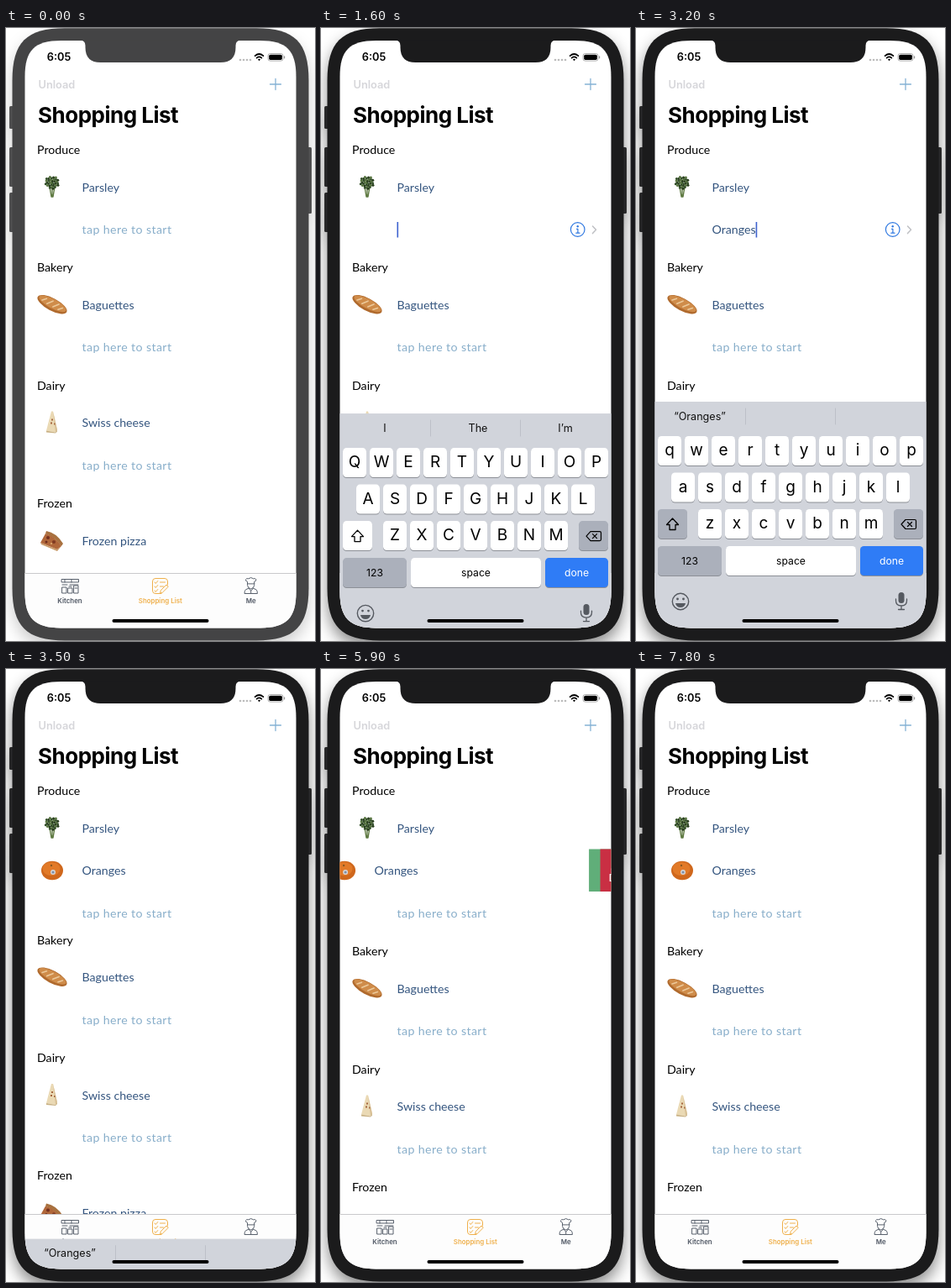
Recreate the animation shown at these times as an HTML page. Size 368 by 730 pixels, loop 8 s.

```html
<!DOCTYPE html>
<html lang="en">
<head>
<meta charset="utf-8">
<title>Shopping list</title>
<style>
html, body { margin: 0; width: 100%; height: 100%; overflow: hidden; background: #fff }
svg { display: block; width: 368px; height: 730px }
text { font-family: Inter, sans-serif }
.list { font: 14.2px Lato, sans-serif }
.item { fill: #34557f }
.hint { fill: #88aeca; letter-spacing: .38px }
.mid { text-anchor: middle }
.key { font-size: 19px }
.small { font-size: 12.2px }
.word { font-size: 12.6px }
.tab { font-size: 7.9px; font-weight: 600; fill: #4c5461 }
.line { fill: none; stroke-linecap: round; stroke-linejoin: round }
.action { font-size: 12px; font-weight: 500; fill: #fff }
</style>
</head>
<body>
<svg id="stage" viewBox="0 0 368 730"></svg>
<script>
const LOOP = 8000, STEP = 100;
const stage = document.getElementById('stage');

const text = (x, y, cls, label, more = '') =>
  `<text x="${x}" y="${y}" class="${cls}" ${more}>${label}</text>`;
const box = (x, y, w, h, r, fill, more = '') =>
  `<rect x="${x}" y="${y}" width="${w}" height="${h}" rx="${r}" fill="${fill}" ${more}/>`;
const line = (d, color, width = 1) =>
  `<path class="line" d="${d}" stroke="${color}" stroke-width="${width}"/>`;
const at = (x, y, inner, id = '') => `<g id="${id}" transform="translate(${x} ${y})">${inner}</g>`;

// Rectangle whose corners blend smoothly into the sides
function softBox(x, y, w, h, r) {
  const s = 1.3 * r, c = .35 * r, X = x + w, Y = y + h;
  return `<path d="M${x} ${y + s}C${x} ${y + c} ${x + c} ${y} ${x + s} ${y}H${X - s}
    C${X - c} ${y} ${X} ${y + c} ${X} ${y + s}V${Y - s}C${X} ${Y - c} ${X - c} ${Y} ${X - s} ${Y}
    H${x + s}C${x + c} ${Y} ${x} ${Y - c} ${x} ${Y - s}Z"/>`;
}

// Food pictures, each centred on its own origin
function parsley() {
  let leaves = '';
  for (let i = 0; i < 34; i++) {
    const a = i * 2.4, r = Math.sqrt(i / 34);
    const x = Math.cos(a) * r * 8.5, y = -5 + Math.sin(a) * r * 7.5;
    leaves += `<circle cx="${x * (1 - Math.max(0, y) / 8)}" cy="${y}" r="1.5" fill="${['#34502a', '#587540', '#273d1d'][i % 3]}"/>`;
  }
  return line('M-1 12L-3 0M0 12V0M1 12L3 0', '#5f7a42', 1.4) + leaves;
}
const baguette = () => `<g transform="rotate(28)">
  <ellipse rx="19.5" ry="7.4" fill="#b06a2d"/><ellipse cy="-1" rx="18" ry="5.6" fill="#cf8c4a"/>
  ${line('M-13 1l4-4M-6 2l5-6M2 2l5-6M9 2l4-4', '#ecc99a', 1.6)}</g>`;
const cheese = () => `<path d="M-1-13L1-13 6 9 4 12-7 10Z" fill="#ead9b4"/>
  <path d="M1-13L6 9 4 12Z" fill="#d8c096"/><path d="M-7 10L4 12 6 9 6 11 4 13-7 12Z" fill="#c9b183"/>
  <path d="M-1-4h2v2h-2zM-2 0h2v2h-2zM2 1h1.500v2h-1.500z" fill="#a5673f"/>`;
const pizza = () => `<path d="M-7-11Q5-9 13 4L11 7Q3-4-8-8Z" fill="#a8713f"/>
  <path d="M-8-8Q3-5 11 7L6 11-14 3Z" fill="#b0673a"/><path d="M-14 3L6 11 11 7 6 13-13 5Z" fill="#c79a68"/>
  <circle cx="-5" cy="-3" r="2" fill="#74301f"/><circle cx="2" cy="2" r="2.100" fill="#7f3a22"/>
  <circle cx="-7" cy="2" r="1.500" fill="#6d2c1d"/><circle cx="-1" cy="4" r="1" fill="#e2b274"/>`;
const orange = () => `<ellipse rx="13" ry="11.2" fill="#cf671c"/>
  <ellipse cx="-1" cy="-2" rx="10.5" ry="8" fill="#e27a28"/><circle cx="-1" cy="-6" r="1.2" fill="#8b5a22"/>
  <circle cx="1" cy="2" r="3" fill="#d8d6d8"/><circle cx="1" cy="2" r="1.6" fill="#7d8fa8"/>`;

const hint = y => text(90.5, y, 'list hint', 'tap here to start');
const section = (y, title, name, picture) =>
  text(37, y, 'list', title) + text(90.5, y + 44.6, 'list item', name) + at(55, y + 39, picture());

const header = () =>
  text(38.5, 71.8, '', 'Unload', 'font-size="12.8" font-weight="600" fill="#d6d6da"') +
  line('M314.5 67h13M321 60.5v13', '#85b2d5', 1.3) +
  text(38, 112.5, '', 'Shopping List', 'font-size="26" font-weight="700" letter-spacing="-.5"');

const status = () =>
  text(48.8, 39.3, '', '6:05', 'font-size="12.8" font-weight="600"') +
  [279, 283, 287, 291].map(x => `<circle cx="${x}" cy="38" r="1.3" fill="#bbb"/>`).join('') +
  line('M296.6 33.2q4.9-4.4 9.8 0M298.6 35.6q2.9-2.5 5.8 0', '#000', 1.7) +
  '<path d="M299.9 37.3q1.6-1.3 3.2 0l-1.6 1.9z"/>' +
  box(312, 30.5, 18, 8.6, 2.6, 'none', 'stroke="#999" stroke-width=".8"') +
  box(313.2, 31.7, 15.6, 6.2, 1.6, '#000') + box(331, 33.2, 1.2, 3.2, .6, '#999');

function tabBar() {
  const ink = '#59616d', gold = '#efb04c';
  return box(22, 649, 324, 66, 0, '#fdfdfd') + line('M22 649.5h324', '#c9c9cb') +
    line('M66.5 656.5h20v3.5h-20zM70 656.5v3.5M78 656.5v3.5M67 663h6M76 663h10M67 666h5v7h-5zM74 667h5v6h-5zM75 665h3M81 664h5v9h-5zM82 667h3', ink) +
    text(76, 685, 'tab mid', 'Kitchen') +
    line('M192.5 663v-4q0-3.5-3.5-3.5h-11q-3.5 0-3.5 3.5v11q0 3.5 3.5 3.5h7M177 660l1.3 1.5 2.5-3M177 665l1.3 1.5 2.5-3M177 670l1.3 1.5 2.5-3M183.5 660h6M183.5 665h4M183.5 673l1-3.5 6.5-6.5 2.3 2.3-6.5 6.5z', gold) +
    text(183.8, 685, 'tab mid', 'Shopping List', `style="fill:${gold}"`) +
    line('M287.5 661.5v-2.2q-2.5-.6-2-2.5 1-2 3.2-1 3-2.5 6 0 2.5-.8 3.2 1 .2 2-2.2 2.5v2.2zM287.5 661.5v2q.5 4 4.2 4.5 3.5-.5 4-4.5v-2M289.5 667l-4 1.8q-1.5 1-1.5 4.7h15.4q0-3.7-1.5-4.7l-4-1.8M289.5 668l2.2 2 2.2-2M291.7 670v3', ink) +
    text(291.7, 685, 'tab mid', 'Me');
}

function keyboard() {
  const cap = (x, y, w, fill = '#fff', id = '') =>
    box(x, y + 1, w, 35, 4.5, '#8c8f96') + box(x, y, w, 35, 4.5, fill, `id="${id}"`);
  const rows = ['qwertyuiop', 'asdfghjkl', 'zxcvbnm'];
  let out = box(22, 445, 324, 285, 0, '#d1d4db') + line('M130.5 453v19M237.5 453v19', '#bcc0c8') +
    [76, 187, 291].map(x => text(x, 466.8, 'mid word', '')).join('');
  rows.forEach((row, r) => [...row].forEach((c, i) => {
    const x = [40, 56, 88][r] + i * 32, y = 486 + r * 43.5;
    out += cap(x - 14, y, 28) + text(x, y + 23, 'key mid letter', c);
  }));
  const grey = '#abb0bb', dark = '#555960';
  return out +
    cap(26, 573, 35, grey, 'shift') + line('M43.5 584l7 7.5h-3.5v6h-7v-6h-3.5z', '#000', 1.3) +
    cap(307, 573, 35, grey) + line('M316 591l5-5.5h11q1.5 0 1.5 1.5v8q0 1.5-1.5 1.5h-11zM323.5 588.5l5 5M328.5 588.5l-5 5', '#000', 1.2) +
    cap(26, 617, 76, grey) + text(64, 639, 'small mid', '123') +
    cap(107, 617, 155) + text(184.5, 638.5, 'small mid', 'space') +
    cap(267, 617, 75, '#2f7cf6') + text(304.5, 638.5, 'small mid', 'done', 'fill="#fff"') +
    `<circle cx="53" cy="683" r="9.7" fill="none" stroke="${dark}" stroke-width="1.4"/>
    <circle cx="49.5" cy="680" r="1.4" fill="${dark}"/><circle cx="56.5" cy="680" r="1.4" fill="${dark}"/>
    <path d="M47 685h12q-1 5-6 5t-6-5z" fill="${dark}"/>` +
    box(312.5, 672, 7, 13, 3.5, dark) + line('M309.5 680v2q0 6 6.5 6t6.5-6v-2M316 688v4.5M312.5 692.5h7', dark, 1.3);
}

const field = () => text(90.5, 244.8, 'list item', '', 'id="typed"') +
  box(0, 231, 1.6, 18.5, 0, '#3d62cf', 'id="caret"') +
  '<circle cx="305.7" cy="240" r="8.3" fill="none" stroke="#2f78e0" stroke-width="1.2"/>' +
  '<circle cx="305.7" cy="236.3" r="1.2" fill="#2f78e0"/>' +
  line('M304.5 239.3h1.4v4.7M303.8 244.2h4.2', '#2f78e0', 1.2) +
  line('M323.5 236l4 4.3-4 4.3', '#bfc0c4', 1.5);

const loadButton = () => box(0, 214.5, 58, 50.5, 0, '#60ae79') + text(28.5, 244.3, 'action mid', 'Load');
const deleteButton = () => box(0, 214.5, 58, 50.5, 0, '#c92f43') +
  line('M23.5 225.5h10M27 225v-1.5h3v1.5', '#fff', 1.2) +
  '<path d="M24 227h9l-.8 9.5h-7.4z" fill="#fff"/>' + line('M27 229v5.5M30 229v5.5', '#c92f43', .8) +
  text(28.5, 253.3, 'action mid', 'Delete');

const fade = (id, from, to) => `<linearGradient id="${id}"><stop offset="${from}" stop-color="#111"/>
  <stop offset="${to}" stop-color="#d1d4db"/></linearGradient>`;

stage.innerHTML = `<defs>
  <clipPath id="screen">${softBox(22.5, 15, 323, 699.5, 33)}</clipPath>
  ${fade('late', .65, 1.12)}${fade('later', -.5, .6)}</defs>
  <g id="body">
    <g opacity=".93">${box(4, 93, 8, 27, 1.5, 'inherit')}${box(4, 142, 8, 47, 1.5, 'inherit')}
    ${box(4, 196, 8, 47, 1.5, 'inherit')}${box(356, 142, 8, 79, 1.5, 'inherit')}</g>
    ${softBox(7.5, .3, 353, 729.2, 48)}
  </g>
  <g clip-path="url(#screen)">
    ${box(22, 15, 324, 700, 0, '#fff')}${header()}
    ${section(150, 'Produce', 'Parsley', parsley)}
    <g id="empty">${hint(244.8)}</g>
    <g id="field">${field()}</g>
    <g id="added">${at(0, 0, text(90.5, 244.8, 'list item', 'Oranges') + at(55, 240, orange()), 'row')}
      ${at(346, 0, loadButton(), 'load')}${at(346, 0, deleteButton(), 'remove')}</g>
    <g id="fresh">${hint(295.8)}</g>
    <g id="rest">
      ${section(290.2, 'Bakery', 'Baguettes', baguette)}${hint(385.2)}
      ${section(430.6, 'Dairy', 'Swiss cheese', cheese)}${hint(525.6)}
      ${section(571, 'Frozen', 'Frozen pizza', pizza)}
    </g>
    ${tabBar()}<g id="keyboard">${keyboard()}</g>
    ${status()}${box(126.5, 704, 115, 4, 2, '#000')}
  </g>
  <path id="notch" d="M88 14.5q6.5 0 6.5 6.5v2q0 18 18 18h143q18 0 18-18v-2q0-6.5 6.5-6.5z"/>`;

const $ = id => document.getElementById(id);
const words = [...stage.querySelectorAll('.word')];
const letters = [...stage.querySelectorAll('.letter')];
const lower = letters.map(k => k.textContent);

const typing = [[1400, ''], [2000, 'O'], [2300, 'Or'], [2500, 'Ora'], [2600, 'Oran'],
  [2800, 'Orang'], [2900, 'Orange'], [3000, 'Oranges']];
const guesses = [[1400, 'I', 'The', 'I’m'], [2100, '“O”', 'Of', 'On'], [2500, '“Or”', 'Ordered', 'Original'],
  [2700, '“Oran”', 'Orange', 'Oranges'], [3100, '“Oranges”', '', '']];

const latest = (list, t) => list.reduce((found, e) => e[0] <= t ? e : found, list[0]);
const part = (t, start, length) => Math.min(1, Math.max(0, (t - start) / length));
const easeOut = u => 1 - (1 - u) ** 3;
const easeBoth = u => u * u * (3 - 2 * u);
const show = (id, on) => $(id).style.display = on ? '' : 'none';
const move = (id, x, y) => $(id).setAttribute('transform', `translate(${x} ${y})`);

function draw(t) {
  const dark = t >= 1300, color = dark ? '#1b1b1c' : '#444445';
  $('body').style.fill = $('notch').style.fill = color;
  $('body').style.filter = `drop-shadow(0 9px 9px rgba(0,0,0,${dark ? .45 : .2}))`;

  show('empty', t < 1400);
  show('field', t >= 1400 && t < 3400);
  show('added', t >= 3400);
  show('fresh', t >= 3400);
  $('fresh').style.opacity = part(t, 3300, 200);
  move('rest', 0, 51 * easeOut(part(t, 3350, 420)));

  const up = easeOut(part(t, 1350, 400)), down = easeOut(part(t, 3300, 400));
  show('keyboard', t >= 1400 && t < 3700);
  move('keyboard', 0, 267 * (1 - up + down));

  const typed = latest(typing, t)[1];
  $('typed').textContent = typed;
  $('caret').setAttribute('x', 90.5 + (typed ? $('typed').getComputedTextLength() : 0));
  letters.forEach((k, i) => k.textContent = typed ? lower[i] : lower[i].toUpperCase());
  $('shift').setAttribute('fill', typed ? '#abb0bb' : '#fff');

  const [since, ...guess] = latest(guesses, t);
  const arriving = t - since < STEP;
  words.forEach((w, i) => {
    w.textContent = guess[i];
    w.setAttribute('fill', arriving && i ? `url(#${i > 1 ? 'later' : 'late'})` : '#111');
  });

  const swipe = 116 * (easeBoth(part(t, 5650, 800)) - easeBoth(part(t, 7100, 500)));
  move('row', -swipe, 0);
  move('load', 346 - swipe, 0);
  move('remove', 346 - swipe / 2, 0);
}

function tick() {
  draw(Math.floor(performance.now() % LOOP / STEP) * STEP);
  requestAnimationFrame(tick);
}
tick();
</script>
</body>
</html>
```
